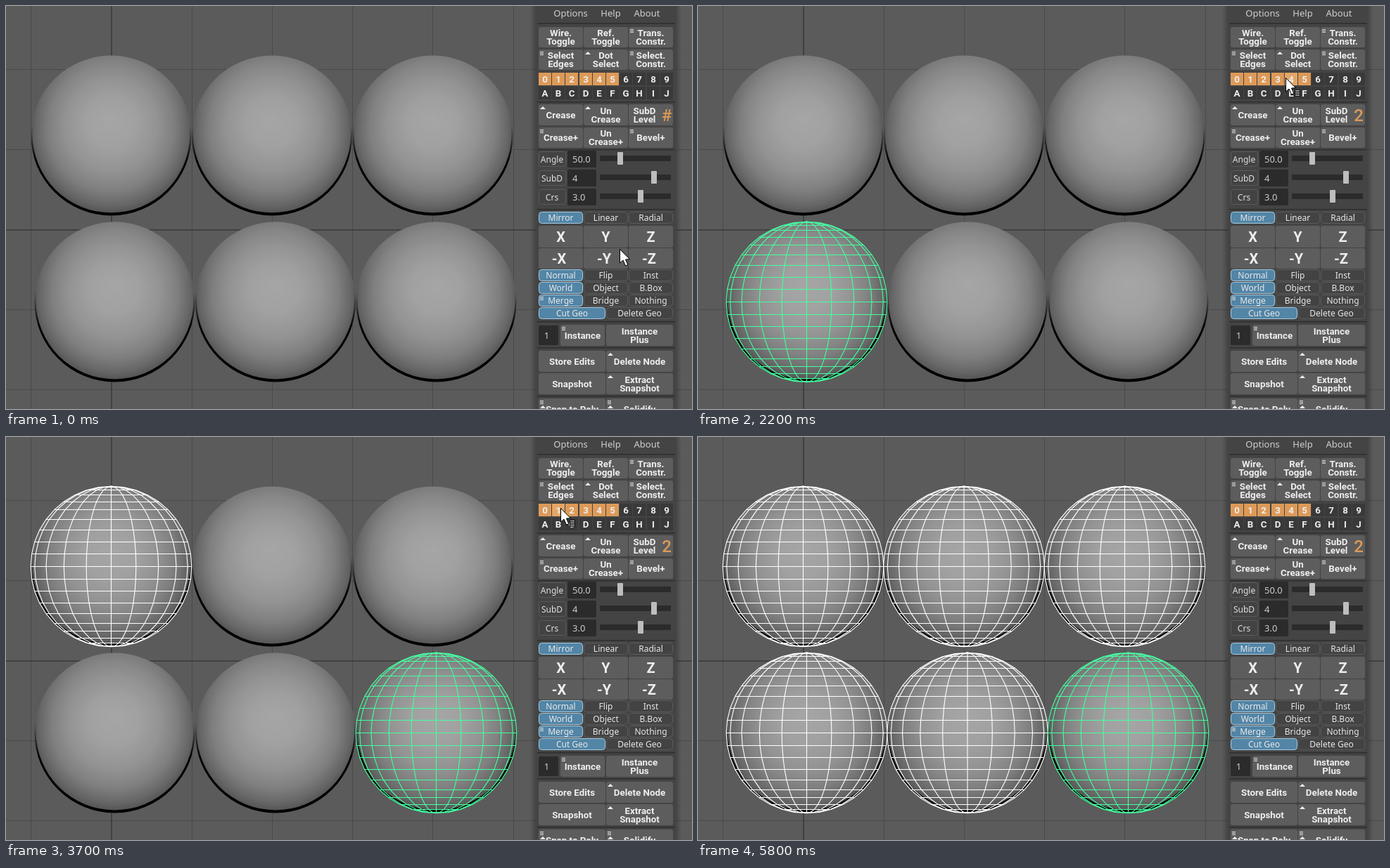
These frames come from a looping animation (975x574 px, 6200 ms). An HTML page with a canvas:

```html
<!DOCTYPE html>
<html lang="en">
<head>
<meta charset="utf-8">
<title>Sphere selection sets</title>
<style>
html, body { margin: 0; width: 100%; height: 100%; overflow: hidden; background: #5b5b5b; }
canvas { display: block; }
</style>
</head>
<body>
<canvas id="stage" width="975" height="574"></canvas>
<script>
const ctx = document.getElementById('stage').getContext('2d');
const W = 975, H = 574, LOOP = 6200, STEP = 100;
const RADIUS = 114;
const GREEN = '#43ffa0', ORANGE = '#dd9a58', BLUE = '#5285a6';
const BOLD = 'bold 13.33px Roboto, sans-serif';
const TAB = '12px "Noto Sans", sans-serif';
const FIELD = '13px "Noto Sans", sans-serif';

const spheres = [];
for (let i = 0; i < 6; i++) {
  const row = Math.floor(i / 3);
  spheres.push({ x: 149.5 + row * 5 + (i % 3) * 228.5, y: 184.5 + row * 237 });
}

// Times at which each sphere becomes the lead, then joins the selection.
const leadTimes = [800, 1200, 1700, 2000, 2500, 2900];
const addTimes = [3500, 3900, 4300, 4700, 5000];
const countPast = (times, t) => times.filter(v => t >= v).length;

// Pointer path: time, x, y
const path = [
  [0, 872, 346], [600, 767, 102], [800, 767, 102], [1000, 786, 100],
  [1200, 786, 100], [1500, 806, 102], [1600, 806, 102], [1700, 813, 103],
  [1800, 822, 102], [2000, 822, 102], [2300, 840, 102], [2500, 840, 102],
  [2700, 861, 101], [2900, 861, 101], [3300, 767, 101], [3500, 767, 101],
  [3700, 788, 101], [3900, 788, 101], [4100, 806, 102], [4300, 806, 102],
  [4400, 822, 102], [4700, 822, 102], [4900, 841, 102], [5000, 841, 102],
  [5300, 861, 102], [5500, 861, 102], [5700, 594, 517], [5800, 594, 517]
];

function pointerAt(t) {
  const i = path.findIndex(p => p[0] > t);
  if (i < 0) return null;
  const [t0, x0, y0] = path[i - 1], [t1, x1, y1] = path[i];
  const u = (t - t0) / (t1 - t0), e = u * u * (3 - 2 * u);
  return { x: x0 + (x1 - x0) * e, y: y0 + (y1 - y0) * e };
}

function rect(x, y, w, h, fill) {
  ctx.fillStyle = fill;
  ctx.fillRect(x, y, w, h);
}

function rounded(x, y, w, h, r, fill, stroke) {
  ctx.beginPath();
  ctx.roundRect(x, y, w, h, r);
  if (fill) { ctx.fillStyle = fill; ctx.fill(); }
  if (stroke) { ctx.strokeStyle = stroke; ctx.lineWidth = 1; ctx.stroke(); }
}

function text(str, x, y, font, color = '#eeeeee', align = 'center') {
  ctx.font = font;
  ctx.fillStyle = color;
  ctx.textAlign = align;
  ctx.fillText(str, x, y);
}

function polygon(points, fill, stroke) {
  ctx.beginPath();
  points.forEach(([x, y]) => ctx.lineTo(x, y));
  ctx.closePath();
  ctx.fillStyle = fill;
  ctx.fill();
  if (stroke) { ctx.strokeStyle = stroke; ctx.lineWidth = 1; ctx.stroke(); }
}

function drawGrid() {
  rect(0, 0, W, H, '#5b5b5b');
  for (let x = 35; x < W; x += 114.25) rect(Math.round(x), 0, 1, H, '#4a4a4a');
  for (let y = 90; y < H; y += 114) rect(0, y, W, 1, '#4a4a4a');
  rect(149, 0, 2, H, '#414141');
  rect(0, 318, W, 2, '#414141');
}

function drawSphere({ x, y }) {
  const r = RADIUS;
  const shade = ctx.createRadialGradient(x, y - 26, 0, x, y - 5, r + 5);
  [[0, '#a6a6a6'], [0.3, '#a1a1a1'], [0.55, '#939393'], [0.75, '#7f7f7f'],
   [0.9, '#666666'], [1, '#4f4f4f']].forEach(s => shade.addColorStop(...s));
  ctx.beginPath();
  ctx.arc(x, y, r, 0, 7);
  ctx.fillStyle = shade;
  ctx.fill();

  const topLight = ctx.createLinearGradient(0, y - r, 0, y - 20);
  topLight.addColorStop(0, 'rgba(150,150,150,.45)');
  topLight.addColorStop(1, 'rgba(150,150,150,0)');
  ctx.fillStyle = topLight;
  ctx.fill();

  const rim = ctx.createLinearGradient(0, y - 15, 0, y + 35);
  rim.addColorStop(0, 'rgba(0,0,0,0)');
  rim.addColorStop(1, '#000');
  ctx.beginPath();
  ctx.arc(x, y, r, 0, 7);
  ctx.closePath();
  ctx.moveTo(x + r - 2, y - 2);
  ctx.arc(x, y - 2, r - 2, 0, 7);
  ctx.fillStyle = rim;
  ctx.fill('evenodd');
}

function drawWire({ x, y }, color) {
  const r = RADIUS + 0.3, rad = Math.PI / 180;
  ctx.beginPath();
  for (let a = -81; a <= 81; a += 9) {
    const half = r * Math.cos(a * rad), ly = Math.floor(y + r * Math.sin(a * rad)) + 0.5;
    ctx.moveTo(x - half, ly);
    ctx.lineTo(x + half, ly);
  }
  for (let m = -90; m <= 90; m += 18) {
    for (let a = -90; a <= 90; a += 9) {
      const px = x + r * Math.sin(m * rad) * Math.cos(a * rad);
      const py = y + r * Math.sin(a * rad);
      if (a === -90) ctx.moveTo(px, py); else ctx.lineTo(px, py);
    }
  }
  ctx.strokeStyle = color;
  ctx.lineWidth = 1.1;
  ctx.stroke();
}

function drawLines(x, y) {
  for (let i = 0; i < 3; i++) rect(x, y + i * 2, 5, 1, '#d8d8d8');
}

function drawPeak(x, y) {
  polygon([[x, y + 4], [x + 4, y], [x + 8, y + 4]], '#eeeeee');
}

function button(x, y, w, h, label, mark = '', font = BOLD) {
  rounded(x, y, w, h, 3, '#5d5d5d');
  const lines = label.split('|'), size = parseFloat(font.match(/[\d.]+/)[0]);
  const base = y + h / 2 + size * 0.36 - (lines.length - 1) * 6;
  lines.forEach((s, i) => text(s, x + w / 2, base + i * 12, font));
  if (mark === '=') drawLines(x + 2, y + 3);
  if (mark === '^') drawPeak(x + 2, y + 3);
}

function tab(x, y, w, label, on) {
  rounded(x + 0.5, y + 0.5, w - 1, 16, 4, on ? BLUE : '#434343', on ? '#a9cbe0' : '#5a5a5a');
  text(label, x + w / 2, y + 13, TAB, '#e8e8e8');
}

const COLS = [757, 821, 885];
function buttonRow(y, h, items) {
  items.forEach(([label, mark, font], i) => button(COLS[i], y, 63, h, label, mark, font));
}
function tabRow(y, labels, on) {
  labels.forEach((s, i) => tab(COLS[i], y, 63, s, i === on));
}

function separator(y) {
  rect(755, y, 196, 1, '#2e2e2e');
  rect(755, y + 1, 196, 1, '#393939');
}

function slider(y, label, value, knob) {
  rounded(757.5, y - 10.5, 38, 21, 3, '#434343', '#5a5a5a');
  text(label, 776, y + 4.5, TAB, '#e0e0e0');
  rounded(798, y - 12, 41, 24, 2, '#2b2b2b');
  text(value, 805, y + 5, FIELD, '#cccccc', 'left');
  rounded(844, y - 5, 101, 8, 1, '#2b2b2b');
  rounded(knob - 4, y - 10, 8, 18, 1, '#bdbdbd');
}

function drawKeys(hover) {
  for (let i = 0; i < 10; i++) {
    const x = Math.round(757 + i * 19.2), mid = x + 9;
    const fill = i < 6 ? (i === hover ? '#e5a666' : ORANGE) : '#393939';
    rect(x, 95, 18, 18, fill);
    rect(x, 115, 18, 18, '#393939');
    text(String(i), mid, 108.5, BOLD);
    text('ABCDEFGHIJ'[i], mid, 128.5, BOLD);
  }
}

function drawPanel(level, hover) {
  const edge = ctx.createLinearGradient(745, 0, 960, 0);
  edge.addColorStop(0, 'rgba(50,50,50,0)');
  edge.addColorStop(0.04, 'rgba(50,50,50,.6)');
  edge.addColorStop(0.96, 'rgba(50,50,50,.6)');
  edge.addColorStop(1, 'rgba(50,50,50,0)');
  rect(745, 0, 215, H, edge);
  rect(753, 0, 199, H, '#444444');

  text('Options', 802.5, 15, FIELD, '#d0d0d0');
  text('Help', 859.5, 15, FIELD, '#d0d0d0');
  text('About', 911, 15, FIELD, '#d0d0d0');
  [24, 136, 204, 289, 449, 486, 555].forEach(separator);

  buttonRow(30, 29, [['Wire.|Toggle'], ['Ref.|Toggle'], ['Trans.|Constr.', '=']]);
  buttonRow(62, 29, [['Select|Edges', '='], ['Dot|Select', '^'], ['Select.|Constr.', '=']]);
  drawKeys(hover);
  buttonRow(140, 30, [['Crease', '^'], ['Un|Crease', '^'], ['']]);
  text('SubD', 907.5, 154, BOLD);
  text('Level', 907.5, 166, BOLD);
  text(level, 939, 164, '500 24px Roboto, sans-serif', ORANGE);
  buttonRow(173, 29, [['Crease+', '='], ['Un|Crease+'], ['Bevel+', '=']]);

  slider(218, 'Angle', '50.0', 873);
  slider(245, 'SubD', '4', 921);
  slider(272, 'Crs', '3.0', 902);

  const big = 'bold 20px Roboto, sans-serif';
  tabRow(293, ['Mirror', 'Linear', 'Radial'], 0);
  buttonRow(313, 31, ['X', 'Y', 'Z'].map(s => [s, '', big]));
  buttonRow(345, 29, ['-X ', '-Y ', '-Z '].map(s => [s, '', big]));
  tabRow(375, ['Normal', 'Flip', 'Inst'], 0);
  tabRow(393, ['World', 'Object', 'B.Box'], 0);
  tabRow(411, ['Merge', 'Bridge', 'Nothing'], 0);
  drawLines(759, 414);
  tab(757, 429, 95, 'Cut Geo', true);
  tab(853, 429, 95, 'Delete Geo', false);

  rounded(757, 455, 28, 28, 2, '#2b2b2b');
  text('1', 768.5, 474, FIELD, '#cccccc');
  button(788, 454, 63, 30, 'Instance', '=');
  button(853, 454, 95, 30, 'Instance|Plus');
  button(757, 491, 95, 30, 'Store Edits');
  button(853, 491, 95, 30, 'Delete Node', '^');
  button(757, 523, 95, 30, 'Snapshot');
  button(853, 523, 95, 30, 'Extract|Snapshot', '^');
  button(757, 559, 95, 30, 'Snap to Poly', '=');
  button(853, 559, 95, 30, 'Solidify', '=');
  drawPeak(759, 569);
  drawPeak(855, 569);
}

function drawPointer({ x, y }, withMenu) {
  ctx.save();
  ctx.translate(Math.round(x) + 0.5, Math.round(y) + 0.5);
  polygon([[0, 0], [0, 19.5], [4.5, 15.5], [8, 23.5], [11.3, 22], [8, 14.5], [14, 14.2]], '#ffffff', '#000000');
  if (withMenu) {
    rect(12.5, 16.5, 8, 10, '#111111');
    for (let i = 0; i < 4; i++) rect(13.5, 17.5 + i * 2.3, 6, 1, '#d8d8d8');
  }
  ctx.restore();
}

function draw(t) {
  const pointer = pointerAt(t);
  const onKeys = !!pointer && pointer.y >= 94 && pointer.y < 114;
  const hover = onKeys ? Math.floor((pointer.x - 757) / 19.2) : -1;
  const lead = countPast(leadTimes, t) - 1, added = countPast(addTimes, t);

  drawGrid();
  spheres.forEach(drawSphere);
  spheres.slice(0, added).forEach(s => drawWire(s, '#ffffff'));
  if (lead >= 0) drawWire(spheres[lead], GREEN);
  drawPanel(lead < 0 ? '#' : '2', hover);
  if (pointer) drawPointer(pointer, onKeys);
}

const start = performance.now();
let shown = -1;
function tick() {
  const t = Math.floor(((performance.now() - start) % LOOP) / STEP) * STEP;
  if (t !== shown) draw(shown = t);
  requestAnimationFrame(tick);
}
tick();
</script>
</body>
</html>
```
